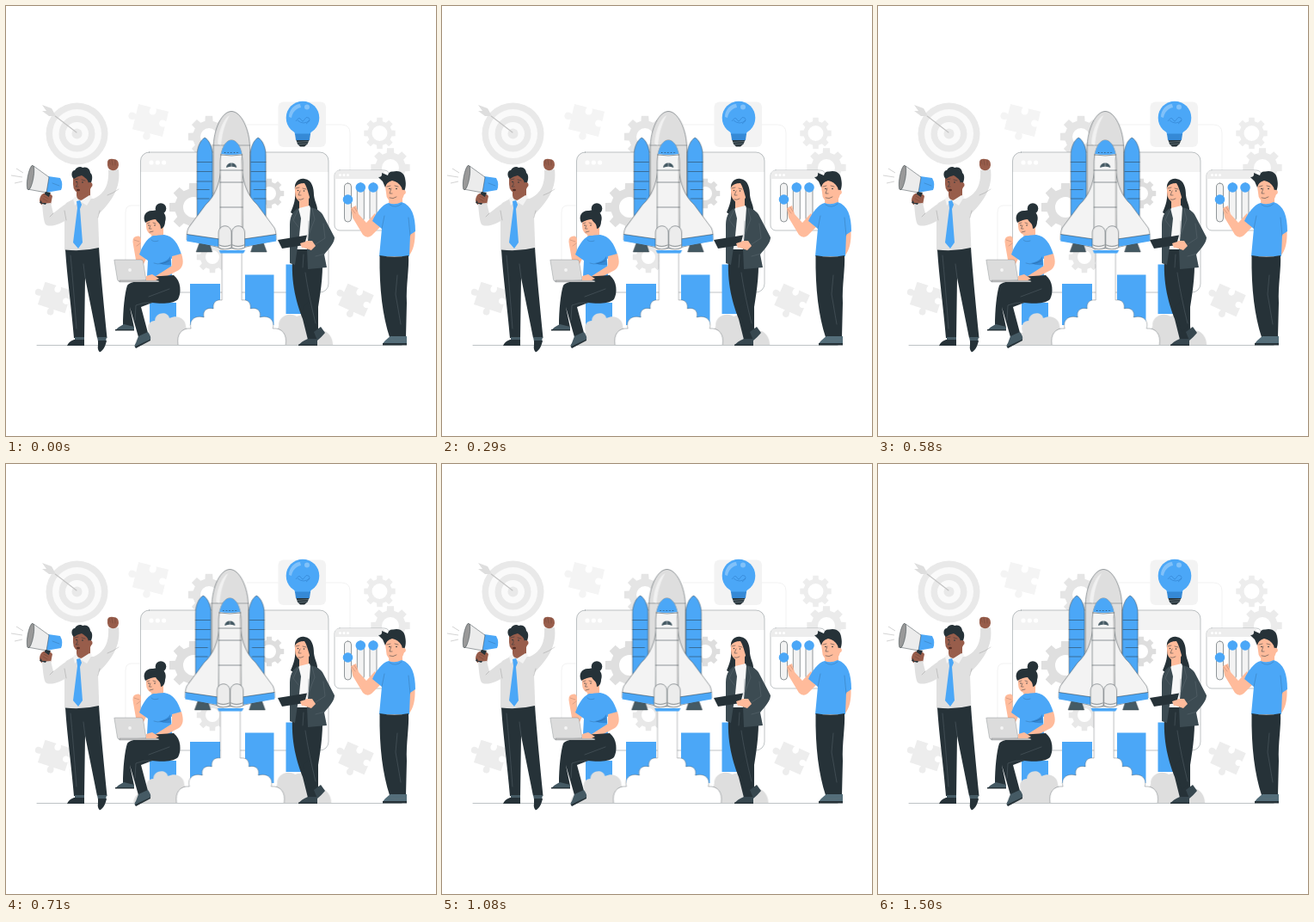
An HTML page for the animation above (1540 ms loop, 500 by 500 pixels).

```html
<!DOCTYPE html>
<html lang="en">
<head>
<meta charset="utf-8">
<title>Launch</title>
<style>
  html, body { margin: 0; width: 100%; height: 100%; overflow: hidden; background: #fff; }
  svg { display: block; width: 100vw; height: 100vh; }
  .blue { fill: #4ba7f7; }
  .dark { fill: #263238; }
  .line { fill: none; stroke: #263238; stroke-width: .5; stroke-linecap: round; stroke-linejoin: round; }
  .edge { stroke: #263238; stroke-width: .45; stroke-linejoin: round; }
  .faint { fill: none; stroke: #ececec; stroke-width: .7; }
  .tan { fill: #ffbb9b; }
  .brown { fill: #985d4b; }
  .shirt { fill: #e0e0e0; }
  .fold { fill: none; stroke: #000; stroke-opacity: .3; stroke-width: .5; stroke-linecap: round; }
  .seam { fill: none; stroke: #66737a; stroke-width: .4; stroke-linecap: round; }
</style>
</head>
<body>
<svg viewBox="0 0 500 500">
  <defs>
    <path id="puzzle" d="M-18-15H-3C-8-4 8-4 3-15H18V-3C8-8 8 8 18 3V15H3C9 26-9 26-3 15H-18V3C-29 9-29-9-18-3Z"/>
    <g id="side">
      <path class="blue edge" d="M222 270V174C222 164 226 156 231 153C236 156 240 164 240 174V270Z"/>
      <path class="line" d="M222 181.500H239M222 192.500H239M222 204H239M222 213.500H236M222 224H236"/>
      <path class="edge" fill="#455a64" d="M225 275H236L239.500 286H221Z"/>
      <path class="edge" fill="#f3f3f3" d="M250 190C248 207 243 221 232 231L212 258C210 262 210 267 210 272L249 281Z"/>
      <path class="blue" d="M210.300 265.500L248 271V280L210 273.500Z"/>
      <path class="line" d="M210.300 265.500L248 271"/>
    </g>
    <g id="pod">
      <path class="edge" fill="#ececec" d="M247 281V264C247 253 262 253 262 264V281Q254 285 247 281Z"/>
      <path class="line" d="M248 278Q254 281 261 278"/>
    </g>
  </defs>

  <g id="gears"></g>
  <g id="target"></g>
  <path class="line" style="stroke:#c4c4c4;stroke-width:1.200" d="M52 124L82 147"/>
  <path fill="#dedede" d="M42 115L53 119L58 128L50 128L42 122L47 122Z"/>
  <g fill="#ededed">
    <use href="#puzzle" fill="#f4f4f4" transform="translate(168 133) rotate(14)"/>
    <use href="#puzzle" transform="translate(57 339) rotate(18) scale(.92)"/>
    <use href="#puzzle" transform="translate(407 342) rotate(24) scale(.92)"/>
  </g>
  <path class="faint" d="M280 138H390Q400 138 400 148V192M156 232H146Q139 232 139 240V297"/>

  <g id="window">
    <rect x="156.500" y="170" width="218.500" height="163" rx="10" fill="#fff"/>
    <path fill="#f3f3f3" d="M156.500 193V180Q156.500 170 166.500 170H365Q375 170 375 180V193Z"/>
    <g fill="#fff"><circle cx="169" cy="182" r="2.600"/><circle cx="176.300" cy="182" r="2.600"/><circle cx="183.600" cy="182" r="2.600"/></g>
    <rect class="line" style="stroke:#7d878b" x="156.500" y="170" width="218.500" height="163" rx="10"/>
  </g>
  <g id="inner"></g>
  <path class="blue" d="M167 345H198V371H167ZM214 323H249V371H214ZM278 312.500H311.500V371H278ZM325.500 300.500H356V358H325.500Z"/>

  <g id="bulb">
    <rect x="316.500" y="111.500" width="55.500" height="52.500" rx="6" fill="#f3f3f3"/>
    <circle class="blue" cx="345" cy="130" r="19.300"/>
    <path class="blue" d="M331 143C335 145 336 147 336 150H354C354 147 355 145 359 143Z"/>
    <path fill="#3589d6" d="M336 148.500H354L353 156H337Z"/>
    <path class="dark" d="M337.500 156H352.500L350.500 160.500L347 163.500H342L339 160.500Z"/>
    <path stroke="#90a4ae" stroke-width=".5" d="M338 158.500L352 157.500M339 161L351 160"/>
    <circle cx="350" cy="117.500" r="3" fill="#fff" opacity=".3"/>
    <path fill="#fff" opacity=".3" d="M329 129C329 121 335 114 342 114L343 118C337 119 333 124 332 130Z"/>
    <path fill="none" stroke="#2a78c4" stroke-width=".5" d="M337 134Q341 128 343 132T347 132T352 130Q355 133 349 137M339 133Q346 139 353 133"/>
  </g>

  <g id="panel">
    <rect class="line" style="fill:#fff;stroke:#7d878b" x="382" y="191" width="64" height="70" rx="6"/>
    <path fill="#ededed" d="M382.300 201V197Q382.300 191.300 388 191.300H440V201Z"/>
    <g fill="#fff"><circle cx="388.500" cy="196.500" r="1.500"/><circle cx="393" cy="196.500" r="1.500"/><circle cx="397.500" cy="196.500" r="1.500"/></g>
    <g id="sliders"></g>
  </g>

  <path class="line" style="stroke:#7d878b" d="M36 394.500H460"/>

  <g transform="translate(.2)"><g id="rocket">
    <g fill="#dedede">
      <path d="M150 394C150 386 158 379 166 380C163 371 167 366 173 366C173 356 188 354 190 363C200 358 209 364 209 373L220 394Z"/>
      <path d="M309 394L317 372C316 362 328 355 338 361C346 357 352 363 352 371C359 370 364 374 364 378C372 375 380 384 380 394Z"/>
    </g>
    <path class="edge" fill="#fff" d="M200 394C198 382 204 374 215 375C212 366 219 359 230 362C228 354 234 350 241 352C240 345 244 341 251 342V286H274V342C281 341 285 345 284 352C291 350 297 354 295 362C306 359 313 366 310 375C321 374 327 382 325 394" stroke-opacity=".7"/>
    <path class="edge" fill="#dedede" d="M241 262V166C241 143 251 122.500 262 122.500C273 122.500 283.500 143 283.500 166V262Z"/>
    <path fill="#f1f1f1" d="M246 160C247 143 254 130 260 127C253 140 251 150 250 163Z"/>
    <path class="line" d="M241 162H283.500" stroke-opacity=".7"/>
    <use href="#side"/><use href="#side" transform="translate(524) scale(-1 1)"/>
    <path class="edge" fill="#f3f3f3" d="M249 282V183C249 169 254 156 262 156C270 156 275 169 275 183V282Z"/>
    <path fill="#c4c4c4" d="M273 174Q275 180 275 187V262H273.500V190Z"/>
    <path class="blue" d="M250 172C252 162 257 156 262 156C267 156 272 162 274 172Q262 174 250 172Z"/>
    <path stroke="#263238" stroke-width=".9" stroke-dasharray="1 2.600" d="M254 170.500H271"/>
    <path class="line" d="M249.500 173Q262 175 274.500 173M249 191H275M249 205H275M249 234H275"/>
    <path fill="#455a64" d="M256 188C256 180.500 268 180.500 268 188Q262 185.500 256 188Z"/>
    <path stroke="#f1f1f1" stroke-width=".5" d="M262 182V187"/>
    <path class="blue" d="M247.500 284H278L276 287.500H249Z"/>
    <use href="#pod"/><use href="#pod" x="15.500"/>
  </g></g>

  <g id="speaker">
    <path class="brown" d="M41 220Q48 214 54 221L52 231H41Q37 226 41 220Z"/>
    <path class="shirt" d="M76 227C67 230 61 237 55 241L52 229L42 230C43 242 44 251 46 254C51 258 63 254 73 247Z"/>
    <path class="shirt" d="M102 224C113 219 120 210 119 191L131 190C133 207 128 222 108 242Z"/>
    <path class="brown" d="M118 181Q119 177 125 178Q131 178 131 185Q130 192 123 191Q117 190 118 181Z"/>
    <path class="fold" d="M121 184L120 179M124 185L123 179M127 185L127 179M131 213Q124 218 118 220M55 241L51 245"/>
    <path class="shirt" d="M81 223L70 229Q67 233 68 243L68 285H108.500L107 245Q112 232 103 224Z"/>
    <path class="dark" d="M69 283.500Q88 286 108 281C110 310 114 350 117.500 386H106L92 316L91 386H79C76 350 71 315 69 283.500Z"/>
    <path class="seam" d="M90 300L92 316M75 290Q78 320 82 375"/>
    <path class="brown" d="M82 204V220Q82 226 90 226Q97 226 98 220V206Z"/>
    <path class="brown" d="M78 197C79 189 97 188 98 198L99 211Q96 219 88 219Q78 217 78 207Z"/>
    <path class="dark" d="M79 201C75 198 76 191 80 191C82 187 87 186 89 188C94 186 98 190 98 194C102 197 100 205 97 209L95 203C93 200 91 199 88 197Q83 198 79 201Z"/>
    <circle class="brown" cx="97.500" cy="208" r="3"/>
    <path class="line" d="M80 202L84 201M88 202L92 203M83 205V208L81 210H84"/>
    <circle class="dark" cx="82" cy="204.500" r=".8"/><circle class="dark" cx="89" cy="205" r=".8"/>
    <ellipse cx="84" cy="214" rx="2" ry="1.300" fill="#542c24"/>
    <path fill="#f3f3f3" d="M81 221L85 227L80 232L78 224ZM97 220L86 227L94 232L100 222Z"/>
    <path class="blue" d="M82 227L86 226L88 231L86 236L89 275L84 282L78 275L83 235Z"/>
    <path class="fold" d="M70 249L68 238M107 246L109 238"/>
    <path fill="#455a64" d="M80 385H91V390H80ZM106 385H117L116 390H107Z"/>
    <path class="dark" d="M79 388H91V395H71Q73 390 79 388ZM107 389H117C116 394 114 400 109 402.500Q106 400 107 394Z"/>
    <path class="blue" d="M49 198L63 200Q67 207 64 214L46 217Z"/>
    <path fill="#ececec" class="edge" d="M32 186L50 199L47 217L25 213Z"/>
    <ellipse class="edge" cx="28.500" cy="199.500" rx="3.400" ry="14.500" transform="rotate(10 28.500 199.500)" fill="#999"/>
    <path class="dark" d="M46 216L52 217L46 231L39 229Z"/>
    <path class="brown" d="M40 225Q40 219 44 218L51 223L49 229H42Z"/>
    <path class="fold" d="M44 221L49 224M43 224L48 227M54 206L62 209"/>
    <path class="faint" style="stroke:#c0c0c0" d="M20 194L12 189M19 199L6 197M19 204L10 206"/>
  </g>

  <g id="typist">
    <circle class="dark" cx="180" cy="235.500" r="6.300"/>
    <path class="tan" d="M170 257H183V270Q176 275 169 269Z"/>
    <path class="tan" d="M148 278Q146 269 151 268Q157 266 157 273L156 283L164 292L160 300L151 295Z"/>
    <path class="blue" d="M171 267C163 271 158 280 155 289L165 296L164 314H193L192 294L204 289C200 276 195 268 184 266Z"/>
    <path class="tan" d="M193 291L204 288C207 298 206 303 201 307L178 319L171 316L193 302Z"/>
    <path class="tan" d="M163 249C164 240 179 240 181 250L181 260Q178 268 171 267Q163 264 163 256Z"/>
    <path class="dark" d="M162 252C158 244 163 237 171 238C182 235 188 243 185 251C185 256 182 259 180 259C180 252 176 252 174 248Q169 248 162 252Z"/>
    <path class="line" d="M164 253L167 252M171 252L174 253M168 255L166.500 259H169M167 263L171 262"/>
    <circle class="dark" cx="166" cy="255" r=".7"/><circle class="dark" cx="173" cy="255" r=".7"/>
    <path fill="#3589d6" d="M178 299Q188 297 191 291L192 301Q184 302 178 299Z"/>
    <path class="fold" d="M177 273Q172 275 169 272M172 299Q180 302 190 296"/>
    <path class="dark" d="M165 315L195 313C204 320 204 334 200 341C194 347 178 346 170 345L157 350L165 380L154 385L144 350L149 374L136 371C136 354 138 334 141 325Q144 320 165 319Z"/>
    <path class="seam" d="M170 345Q160 344 151 348L150 365M166 338L190 329"/>
    <path fill="#455a64" d="M137 370L149 373V377H127.500Q129 374 137 370ZM154 384L165 379Q169 384 168 388L151 397.500Q148 396 151 392Z"/>
    <path class="dark" d="M127 376H149V377.500H127ZM150 396L168 387.500V389L151 398Z"/>
    <path class="edge" stroke-opacity=".5" fill="#dcdcdc" d="M126 296.500Q125 295 127 295L157 295Q159 295 159.500 297L163 319L132 320.500Q130 320 129.500 318Z"/>
    <path class="edge" stroke-opacity=".5" fill="#c6c6c6" d="M132 319H176Q180 320 177 321H132Z"/>
    <circle cx="144" cy="307" r="1.900" fill="#f5f5f5"/>
    <path class="tan" d="M163 314L170 312L178 317L174 319H163Z"/>
    <path class="fold" d="M149 272L155 274M152 279L156 276"/>
  </g>

  <g id="manager">
    <path class="dark" d="M336 214C335 205 340 200 347 201C356 202 358 212 358 220C359 229 363 232 362 241L348 252L331 240C335 231 337 224 336 214Z"/>
    <path class="tan" d="M341 222H352V237L346 243L341 238Z"/>
    <path class="tan" d="M336 211Q338 202 346 204Q355 206 354 219Q352 230 344 229Q336 226 336 216Z"/>
    <path class="dark" d="M336 211C336 204 344 200 350 204C358 208 357 222 357 230C352 224 352 214 347 206Q339 206 336 211Z"/>
    <path class="line" d="M337 212L341 211M345 212L349 213M342 215L340 220H343M340 225Q343 226 346 224"/>
    <circle class="dark" cx="339.500" cy="214.500" r=".7"/><circle class="dark" cx="346.500" cy="215" r=".7"/>
    <path fill="#f7f7f7" d="M341 235L353 232L357 244L352 285H334L335 245Z"/>
    <path class="dark" d="M334 283H367C370 306 366 331 363 350L363 388H351L345 364C337 343 330 318 334 283Z"/>
    <path class="dark" d="M345 350L353 379L361 372L356 340Z"/>
    <path class="seam" d="M348 310Q352 337 360 369M346 289L345 304"/>
    <path fill="#3c4b52" d="M340 235C332 239 330 247 330 255L330 299L336 301L341 267L343 247Z"/>
    <path fill="#3c4b52" d="M354 234C364 236 368 241 370 246L382 269C382 277 371 287 370 289L373 304L351 306L350 282L352 264Z"/>
    <path class="seam" d="M352 250L351 271M356 236L359 248L352 266M369 253L371 270L357 279M339 238L334 249L340 257M371 288L360 291"/>
    <path class="tan" d="M349 273L356 273L360 279L355 284L346 281Z"/>
    <path class="dark" d="M316 272L350 266.500L347 278L321 282Z"/>
    <path class="tan" d="M342 276Q352 272 357 275L356 280L344 281Z"/>
    <path fill="#37474f" d="M351 387H362V395H340Q343 390 351 387ZM358 379L366 373L371 380Q366 386 362 389Z"/>
    <path class="dark" d="M340 393.500H362V395H340Z"/>
  </g>

  <g id="presenter">
    <path class="tan" d="M429 241L419 252L410 242L407 232L401 235L403 246L415 266Q420 271 425 267L437 255Z"/>
    <path class="fold" d="M402 236L406 241M405 234L408 239"/>
    <path class="tan" d="M446 218L461 216V228Q455 235 445 229Z"/>
    <path class="tan" d="M468 264L475.500 262C476 274 474 284 468 291L463 288L469 280Z"/>
    <path class="blue" d="M445 229C437 231 430 241 426 250L437 259L434 291H469L470 266L476 262C476 244 472 232 460 228Q452 232 445 229Z"/>
    <path class="tan" d="M441 210C440 200 460 195 463 206L463 219Q461 228 452 229Q442 227 442 217Z"/>
    <path class="dark" d="M441 211L438 204L433 199Q438 199 437 194L444 197Q445 192 450 192.500C459 190 464 196 464 201C466 208 464 214 462 218L460 211Q456 204 449 203Q442 205 441 211Z"/>
    <circle class="tan" cx="462" cy="216.500" r="2.800"/>
    <path class="line" d="M443 210L447 209M452 209L456 210M448 212L446 218H449M446 223Q450 225 454 222"/>
    <circle class="dark" cx="446" cy="212.500" r=".8"/><circle class="dark" cx="454" cy="212.500" r=".8"/>
    <path class="fold" d="M437 259L440 244M470 267L468 246M446 231Q453 236 460 230"/>
    <path class="dark" d="M434.500 290Q452 293 468 290C469 305 465 325 466 345L465 385H446C438 360 434 330 434.500 290Z"/>
    <path class="seam" d="M455 313L453 335L459 370"/>
    <path fill="#546e7a" d="M447 384H466V393H438Q440 389 447 384Z"/>
    <path class="dark" d="M438 392H466V394.500H438Z"/>
    <path class="seam" d="M448 388L454 390L465 388"/>
  </g>
</svg>
<script>
const $ = id => document.getElementById(id);

function gear(host, x, y, r, hole, color) {
  const pts = [];
  for (let i = 0; i < 8; i++) {
    for (const [a, k] of [[-.31, .77], [-.22, 1], [.22, 1], [.31, .77]]) {
      const ang = (i + a) * Math.PI / 4;
      pts.push((x + r * k * Math.cos(ang)).toFixed(2) + ' ' + (y + r * k * Math.sin(ang)).toFixed(2));
    }
  }
  const ring = `M${x - hole} ${y}a${hole} ${hole} 0 1 0 ${2 * hole} 0a${hole} ${hole} 0 1 0 ${-2 * hole} 0Z`;
  $(host).innerHTML += `<path fill="${color}" fill-rule="evenodd" d="M${pts.join('L')}Z${ring}"/>`;
}

gear('gears', 236, 152, 24.5, 10, '#e5e5e5');
gear('gears', 434.5, 148, 18.5, 9, '#ededed');
gear('gears', 447, 188, 23, 10, '#ebebeb');
gear('inner', 218, 234, 28.5, 12, '#dfdfdf');
gear('inner', 240, 292, 18.5, 8, '#e8e8e8');
gear('inner', 306, 218, 17.5, 8, '#dedede');

$('target').innerHTML = [36, 28.5, 21, 13.5, 6].map((r, i) =>
  `<circle cx="82.500" cy="148.500" r="${r}" fill="${i % 2 ? '#fafafa' : '#e9e9e9'}"/>`).join('');

$('sliders').innerHTML = [[397.5, 225], [412.3, 211], [427, 211]].map(([x, y]) =>
  `<rect class="line" style="fill:#f3f3f3" x="${x - 4}" y="206" width="8" height="45" rx="4"/>
   <circle class="blue" cx="${x}" cy="${y}" r="5.8"/>`).join('');

// Side-to-side shake, held at 24 pictures per second
const LOOP = 1540, SHAKE = 1500, STEP = SHAKE / 36;
const shifts = [0, -.5, 1, -2, 2, -2, 2, -2, 1, -.5, 0];
const shake = $('rocket').animate(
  shifts.map(x => ({ transform: `translateX(${x}px)`, easing: 'ease' })),
  { duration: SHAKE, iterations: Infinity });
shake.pause();

const start = performance.now();
function draw() {
  const t = (performance.now() - start) % LOOP;
  const n = Math.min(36, Math.floor((t + 5) / STEP));
  shake.currentTime = n * STEP + 7;
  requestAnimationFrame(draw);
}
draw();
</script>
</body>
</html>
```
